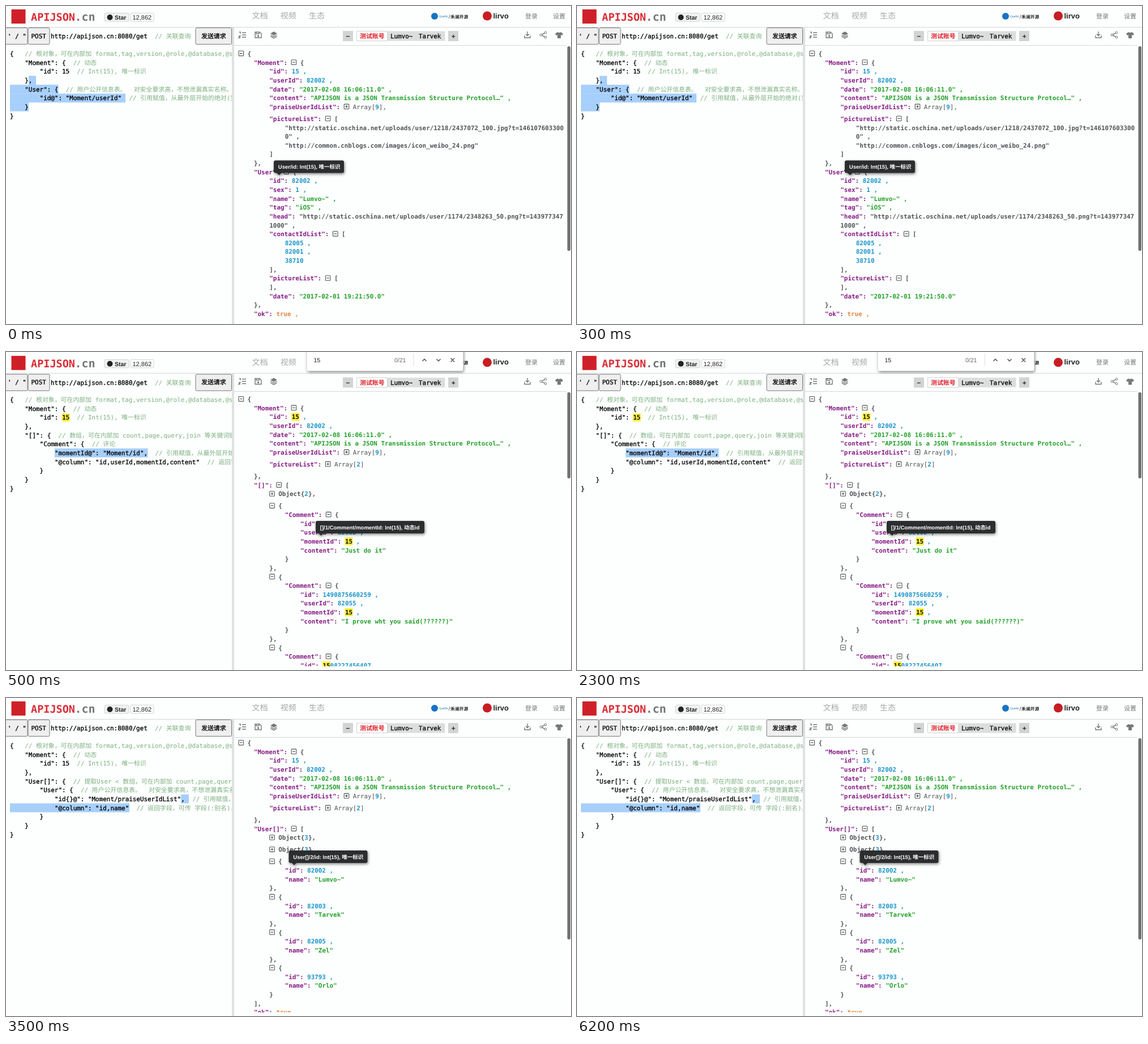
An HTML page that plays this animation: 998x561 px, repeating every 8000 ms.

```html
<!DOCTYPE html>
<html lang="zh">
<head>
<meta charset="utf-8">
<title>APIJSON</title>
<style>
  html, body { margin: 0; width: 100%; height: 100%; overflow: hidden; background: #fcfffd; }
  svg { display: block; width: 100vw; height: 100vh; }
  text { text-rendering: geometricPrecision; }
  .mono { font: 10.92px "DejaVu Sans Mono", "Noto Sans CJK SC", "Noto Sans CJK", monospace; }
  .sans { font: 11px "Liberation Sans", "Noto Sans CJK SC", "Noto Sans CJK", sans-serif; }
  .bold { font-weight: 700; }
  .ink { stroke: #000; stroke-width: .32; }
  .line { fill: none; stroke: #777; stroke-width: 1.4; }
  .float { filter: drop-shadow(1px 2px 2.5px rgba(0, 0, 0, .5)); }
</style>
</head>
<body>
<svg id="stage" viewBox="0 0 998 561">
  <clipPath id="editor"><rect y="38" width="399" height="523"/></clipPath>
  <clipPath id="url"><rect y="38" width="335" height="32"/></clipPath>
  <clipPath id="viewer"><rect x="403" y="70" width="587" height="484.5"/></clipPath>
</svg>
<script>
const CHAR = 6.575, ROW = 15.64, LOOP = 8000;
const BLUE = '#1c94cc', GREEN = '#25a02c', PURPLE = '#881b86', DARK = '#505458', NOTE = '#7fae80';

const scenes = [
  {
    start: 0, top: 84, thumbEnd: 432, shift: 0,
    tip: [473, 272.5, 124, 'User/id: Int(15), 唯一标识'],
    selected: [[3, 40, 53], [4, 7, 92.5], [5, 7, 211], [6, 7, 40]],
    editor: `{   // 根对象，可在内部加 format,tag,version,@role,@database,@schema
    "Moment": {  // 动态
        "id": 15  // Int(15), 唯一标识
    },
    "User": {  // 用户公开信息表。  对安全要求高，不想泄漏真实名称。对名称
        "id@": "Moment/userId"  // 引用赋值，从最外层开始的绝对(完整)路径
    }
}`,
    viewer: `⊟ {
 "Moment": ⊟ {
  "id": 15 ,
  "userId": 82002 ,
  "date": "2017-02-08 16:06:11.0" ,
  "content": "APIJSON is a JSON Transmission Structure Protocol…" ,
  "praiseUserIdList": ⊞ Array[9],
  "pictureList": ⊟ [
   ~"http://static.oschina.net/uploads/user/1218/2437072_100.jpg?t=146107603300
   ~0" ,
   ~"http://common.cnblogs.com/images/icon_weibo_24.png"
  ]
 },
 "User": ⊟ {
  "id": 82002 ,
  "sex": 1 ,
  "name": "Lumvo~" ,
  "tag": "iOS" ,
  "head": ~"http://static.oschina.net/uploads/user/1174/2348263_50.png?t=143977347
  ~1000" ,
  "contactIdList": ⊟ [
   82005 ,
   82001 ,
   38710
  ],
  "pictureList": ⊟ [
  ],
  "date": "2017-02-01 19:21:50.0"
 },
 "ok": true ,`
  },
  {
    start: 500, top: 83.2, thumbEnd: 223, shift: .8, find: true,
    tip: [547, 298, 192, '[]/1/Comment/momentId: Int(15), 动态id'],
    selected: [[6, 86, 250.5]],
    editor: `{   // 根对象，可在内部加 format,tag,version,@role,@database,@schema
    "Moment": {  // 动态
        "id": =15  // Int(15), 唯一标识
    },
    "[]": {  // 数组，可在内部加 count,page,query,join 等关键词键值对
        "Comment": {  // 评论
            "momentId@": "Moment/id",  // 引用赋值，从最外层开始的绝对
            "@column": "id,userId,momentId,content"  // 返回字段，可传
        }
    }
}`,
    viewer: `⊟ {
 "Moment": ⊟ {
  "id": =15 ,
  "userId": 82002 ,
  "date": "2017-02-08 16:06:11.0" ,
  "content": "APIJSON is a JSON Transmission Structure Protocol…" ,
  "praiseUserIdList": ⊞ Array[9],
  "pictureList": ⊞ Array[2]
 },
 "[]": ⊟ [
  ⊞ Object{2},
  ⊟ {
   "Comment": ⊟ {
    "id": 176 ,
    "userId": 82002 ,
    "momentId": =15 ,
    "content": "Just do it"
   }
  },
  ⊟ {
   "Comment": ⊟ {
    "id": 1490875660259 ,
    "userId": 82055 ,
    "momentId": =15 ,
    "content": "I prove wht you said(??????)"
   }
  },
  ⊟ {
   "Comment": ⊟ {
    "id": =1508227456407`
  },
  {
    start: 3500, top: 79.2, thumbEnd: 426, shift: 0,
    tip: [499.5, 269, 139, 'User[]/2/id: Int(15), 唯一标识'],
    selected: [[6, 309, 323], [7, 7, 218]],
    editor: `{   // 根对象，可在内部加 format,tag,version,@role,@database,@schema
    "Moment": {  // 动态
        "id": 15  // Int(15), 唯一标识
    },
    "User[]": {  // 提取User < 数组，可在内部加 count,page,query,join
        "User": {  // 用户公开信息表。  对安全要求高，不想泄漏真实名称
            "id{}@": "Moment/praiseUserIdList",  // 引用赋值，从最外层
            "@column": "id,name"  // 返回字段，可传 字段(:别名)，省略
        }
    }
}`,
    viewer: `⊟ {
 "Moment": ⊟ {
  "id": 15 ,
  "userId": 82002 ,
  "date": "2017-02-08 16:06:11.0" ,
  "content": "APIJSON is a JSON Transmission Structure Protocol…" ,
  "praiseUserIdList": ⊞ Array[9],
  "pictureList": ⊞ Array[2]
 },
 "User[]": ⊟ [
  ⊞ Object{3},
  ⊞ Object{3},
  ⊟ {
   "id": 82002 ,
   "name": "Lumvo~"
  },
  ⊟ {
   "id": 82003 ,
   "name": "Tarvek"
  },
  ⊟ {
   "id": 82005 ,
   "name": "Zel"
  },
  ⊟ {
   "id": 93793 ,
   "name": "Orlo"
  }
 ],
 "ok": true ,`
  }
];

function add(parent, tag, attrs = {}) {
  const node = document.createElementNS('http://www.w3.org/2000/svg', tag);
  for (const name in attrs) node.setAttribute(name, attrs[name]);
  return parent.appendChild(node);
}
const box = (g, x, y, width, height, fill, more) => add(g, 'rect', { x, y, width, height, fill, ...more });
const path = (g, d, more) => add(g, 'path', { d, class: 'line', ...more });
const disc = (g, cx, cy, r, fill) => add(g, 'circle', { cx, cy, r, fill });

function label(g, x, y, str, fill = '#000', cls = 'mono', size) {
  const node = add(g, 'text', { x, y, fill, class: cls });
  if (size) node.style.fontSize = size + 'px';
  node.textContent = str.replace(/ /g, '\u00a0');
}

function mark(g, x, y) {
  box(g, x - .5, y - 7, 2 * CHAR + 1, 14, '#fbf03a', { rx: 1 });
}

function drawHeader(g) {
  box(g, 9.5, 6, 25, 25, '#cf2029');
  label(g, 44, 26, 'APIJSON', '#d92c36', 'mono bold', 18.5);
  label(g, 121.5, 26, '.cn', '#777', 'mono bold', 20);

  const badge = { rx: 2, stroke: '#d0d3d5' };
  box(g, 174, 12.5, 43, 14.5, '#f0f2f2', badge);
  box(g, 220, 12.5, 41, 14.5, '#fff', badge);
  disc(g, 183.5, 20, 5, '#222');
  label(g, 192, 24, 'Star', '#222', 'sans bold', 10.5);
  label(g, 223.5, 24, '12,862', '#222', 'sans');

  ['文档', '视频', '生态'].forEach((str, i) => label(g, 434.5 + i * 50.3, 22, str, '#a5a8a6', 'sans', 14));
  disc(g, 757, 18, 6, '#1673c4');
  label(g, 765, 20, 'Quellin', '#1673c4', 'sans', 5);
  label(g, 782, 22, '/', '#333', 'sans', 9);
  label(g, 785, 21.5, '禾澜开源', '#222', 'sans bold', 7.8);
  disc(g, 850, 17.5, 8, '#c71d23');
  label(g, 860.5, 21.5, 'lirvo', '#222', 'sans bold', 13);
  label(g, 917, 21.5, '登录', '#777', 'sans');
  label(g, 966, 21.5, '设置', '#777', 'sans');
}

function drawToolbar(g) {
  const note = add(g, 'g', { 'clip-path': 'url(#url)' });
  label(note, 79, 57, 'http://apijson.cn:8080/get', '#000', 'mono ink');
  label(note, 263, 57, '// 关联查询 (', NOTE);
  const button = { rx: 2, stroke: '#777' };
  [[-3, 41, 3, `' / "`], [39, 38, 44.5, 'POST'], [335, 63.5, 345, '发送请求']].forEach(([x, w, tx, str]) => {
    box(g, x, 38.5, w, 29, '#efefef', button);
    label(g, tx, 56.5, str, '#000', 'mono ink');
  });

  // list, save, layers
  path(g, 'M417 47h7M417 51h7M417 55h7M412 46h2v3M411 53h3l-3 3h3', { 'stroke-width': 1.2 });
  path(g, 'M440 46h8l3 3v7h-11zM442 46v3h5v-3');
  disc(g, 445.5, 53, 1.7, '#777');
  path(g, 'M473 45l6 3.5-6 3.5-6-3.5z', { style: 'fill:#777;stroke:none' });
  path(g, 'M467.5 51l5.5 3.2 5.5-3.2M467.5 53.7l5.5 3.2 5.5-3.2');

  box(g, 595, 44, 18, 18, '#d2d4d3');
  box(g, 781, 44, 18, 18, '#d2d4d3');
  label(g, 600.5, 57, '−', '#222', 'mono bold');
  label(g, 787, 57, '+', '#222', 'mono bold');
  box(g, 619.5, 44.5, 156, 17, '#dcdedd');
  box(g, 619.5, 44.5, 54, 17, '#fcfffd', { stroke: '#d2d4d3' });
  label(g, 625, 57, '测试账号', '#e0202c', 'mono bold');
  label(g, 679, 57, 'Lumvo~', '#111', 'mono ink');
  label(g, 729, 57, 'Tarvek', '#111', 'mono ink');

  // download, share, shirt
  path(g, 'M921 45v7M918 49.5l3 3 3-3M916 52v4h10v-4');
  path(g, 'M953 47l-8 4 8 4', { 'stroke-width': 1.1 });
  [[953, 47], [945, 51], [953, 55]].forEach(([x, y]) => add(g, 'circle', { cx: x, cy: y, r: 1.9, fill: '#fcfffd', stroke: '#777' }));
  path(g, 'M974 46q3 2 6 0l4 3-2 3-2-1v6h-6v-6l-2 1-2-3z', { style: 'fill:#777;stroke:none' });
}

function drawEditor(g, { editor, selected }) {
  const area = add(g, 'g', { 'clip-path': 'url(#editor)' });
  for (const [row, from, to] of selected) box(area, from, 76.3 + row * ROW, to - from, ROW + .1, '#a7cffb');
  editor.split('\n').forEach((line, row) => {
    const y = 84.2 + row * ROW;
    const at = line.indexOf('=15');
    if (at >= 0) mark(area, 7 + at * CHAR, y);
    line = line.replace('=', '');
    const noteAt = line.indexOf('//');
    const code = noteAt < 0 ? line : line.slice(0, noteAt);
    const indent = code.search(/\S/);
    label(area, 7 + indent * CHAR, y + 4, code.trim(), '#000', 'mono ink');
    if (noteAt >= 0) label(area, 7 + noteAt * CHAR, y + 4, line.slice(noteAt), NOTE);
  });
}

function drawToggle(g, x, y, folded) {
  box(g, x + .4, y - 4.7, 8.6, 8.6, 'none', { rx: 1, stroke: '#555', 'stroke-width': 1.1 });
  path(g, `M${x + 2.4} ${y - .4}h4.6` + (folded ? `M${x + 4.7} ${y - 2.7}v4.6` : ''), { style: 'stroke:#444;stroke-width:1.1' });
}

function drawViewer(g, { viewer, top }) {
  const area = add(g, 'g', { 'clip-path': 'url(#viewer)' });
  const token = /~.*|"[^"]*":|"[^"]*"(?: ,)?|true ,|=15|\d+(?: ,)?| ,|[⊟⊞]|Array|Object|\s|./g;
  let y = top;
  for (const line of viewer.split('\n')) {
    const depth = line.search(/\S/);
    let x = 410.6 + depth * 27.35;
    for (let part of line.trim().match(token)) {
      if (/[⊟⊞]/.test(part)) {
        drawToggle(area, x, y, part === '⊞');
        x += 9.4;
        continue;
      }
      let color = DARK;
      if (part.startsWith('=')) { mark(area, x, y); color = '#111'; }
      else if (/^".*":$/.test(part)) color = PURPLE;
      else if (part[0] === '"') color = GREEN;
      else if (part[0] === 't') color = '#e5853f';
      else if (/^(\d| ,)/.test(part)) color = BLUE;
      part = part.replace(/^[~=]/, '');
      const light = part === 'Array' || (line.includes('Array') && /[\[\],]/.test(part) && color === DARK);
      if (part.trim()) label(area, x, y + 4, part, color, light ? 'mono' : 'mono bold');
      x += part.length * CHAR;
    }
    y += ROW + (line.includes('⊞') ? 5.4 : 0);
  }
}

function drawTip(g, [x, y, width, str]) {
  const tip = add(g, 'g', { class: 'float' });
  box(tip, x, y, width, 22, '#2b2d2e', { rx: 3 });
  path(tip, `M${x + 5} ${y + 21.5}h9l-4.5 4.5z`, { style: 'fill:#2b2d2e;stroke:none' });
  label(g, x + 7.8, y + 14.5, str, '#fff', 'sans bold', 9.5);
}

function drawFind(g) {
  box(g, 531.5, -6, 276, 39.5, '#fff', { rx: 3, class: 'float' });
  label(g, 543.5, 18, '15', '#222', 'sans', 10.5);
  label(g, 686, 18, '0/21', '#666', 'sans', 10.5);
  box(g, 719.5, 3, 1, 22, '#ddd');
  path(g, 'M735.5 16l3.5-3.5 3.5 3.5M760.5 12.5l3.5 3.5 3.5-3.5M785.5 11l6.5 6.5M792 11l-6.5 6.5', { style: 'stroke:#444' });
}

const stage = document.getElementById('stage');
scenes.forEach((scene, index) => {
  const g = add(stage, 'g');
  box(g, 0, 0, 998, 561, '#fcfffd');
  box(g, 0, 37, 998, 1, '#d4d7d5');
  box(g, 403, 69, 587, 1, '#d4d7d5');
  box(g, 399, 38, 4, 523, '#dfe1e0');
  const bar = add(g, 'g', { transform: `translate(0 ${scene.shift})` });
  drawHeader(bar);
  drawToolbar(bar);
  drawEditor(g, scene);
  drawViewer(g, scene);
  box(g, 991.5, 71, 5.5, scene.thumbEnd - 71, '#707271', { rx: 2.7 });
  drawTip(g, scene.tip);
  if (scene.find) drawFind(g);

  const steps = scenes.map((s, i) => ({ offset: s.start / LOOP, opacity: +(i === index), easing: 'step-end' }));
  steps.push({ ...steps[steps.length - 1], offset: 1 });
  g.animate(steps, { duration: LOOP, iterations: Infinity });
});
</script>
</body>
</html>
```
